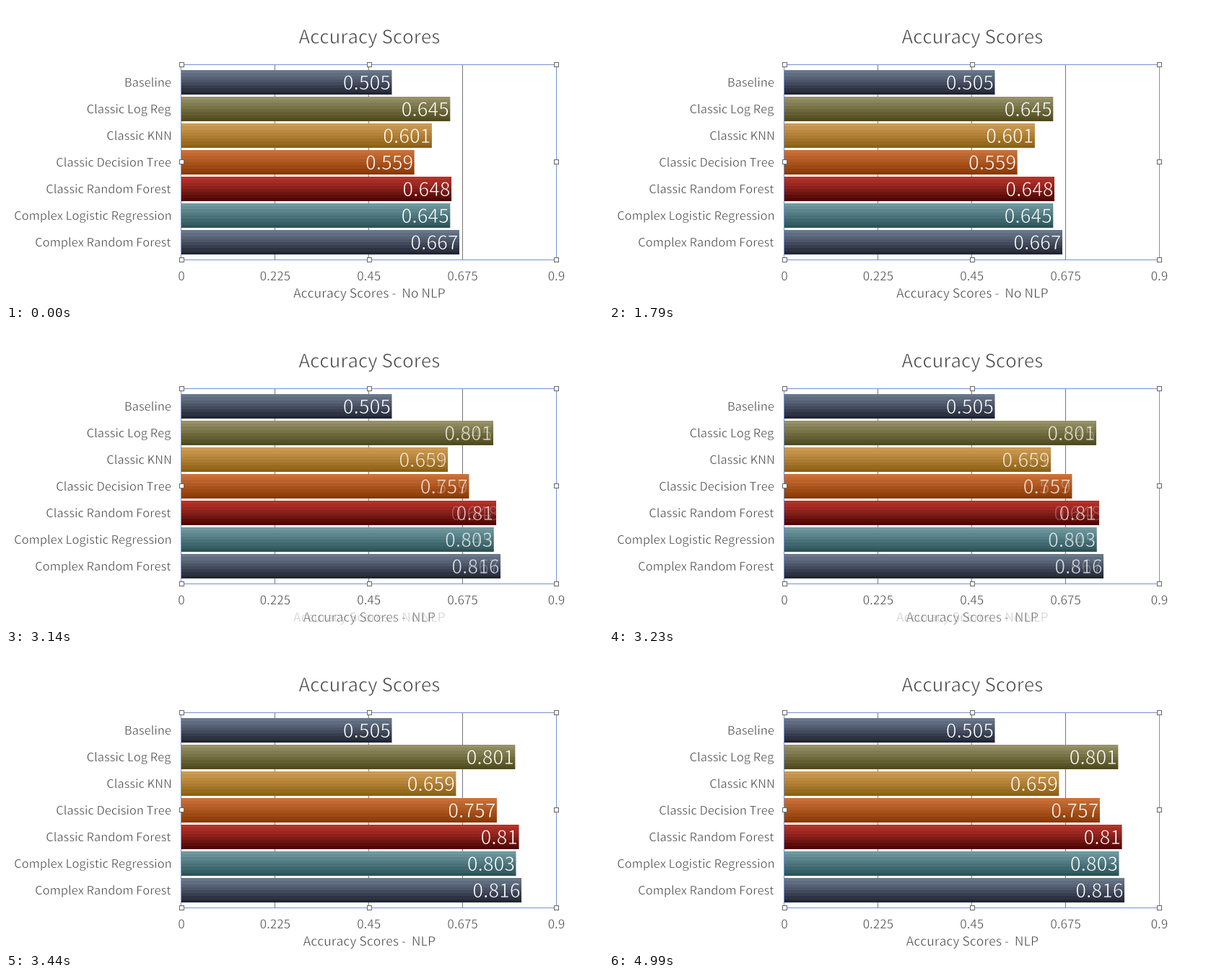
Animation, 827 px wide and 411 px high, one loop 6020 ms. Source, as a matplotlib script:

```python
import numpy as np
import matplotlib.pyplot as plt
from matplotlib.animation import FuncAnimation
from matplotlib.colors import to_rgb
from matplotlib.patches import PathPatch, Rectangle
from matplotlib.path import Path
from matplotlib.textpath import TextPath
from matplotlib.transforms import Affine2D

W, H, DPI = 827, 411, 128
LOOP, TICK = 6020, 20
FONT = dict(family="Noto Sans CJK JP")
INK, GRID, BLUE = "#484848", "#777777", "#7391d6"
LEFT, RIGHT, TOP, BOTTOM = 243, 762, 81, 352
BAR_TOP, BAR_H, PITCH = 89, 34, 37
STRIPS, VALUE_SIZE = 8, 26.5

# The bars grow in visible steps along an ease-in-out curve.
STEP_TIMES = (2990, 3140, 3290, 3440)
STEP_EASE = (0, 0.184, 0.663, 0.977, 1)

SLATE = ("#69778a", "#475062", "#222735")
BARS = [
    ("Baseline", "0.505", "0.505", SLATE),
    ("Classic Log Reg", "0.645", "0.801", ("#969168", "#736e40", "#504b1f")),
    ("Classic KNN", "0.601", "0.659", ("#cc9a52", "#b07f34", "#8d6115")),
    ("Classic Decision Tree", "0.559", "0.757", ("#ca7039", "#ad551f", "#8a3a05")),
    ("Classic Random Forest", "0.648", "0.81", ("#b7302b", "#86201b", "#500603")),
    ("Complex Logistic Regression", "0.645", "0.803", ("#7199a0", "#4c767d", "#2d545a")),
    ("Complex Random Forest", "0.667", "0.816", SLATE),
]

fig = plt.figure(figsize=(W / DPI, H / DPI), dpi=DPI, facecolor="white")
ax = fig.add_axes([0, 0, 1, 1])
ax.set_xlim(0, W)
ax.set_ylim(H, 0)
ax.axis("off")


def signed_area(p):
    x, y = p.T
    return np.sum(x * np.roll(y, -1) - y * np.roll(x, -1)) / 2


def inset(p, d):
    """Move a closed outline by d along its left-hand normals."""
    p = p[np.hypot(*(np.roll(p, -1, 0) - p).T) > 0.01]
    e = np.roll(p, -1, 0) - p
    e /= np.hypot(*e.T)[:, None]
    n = np.column_stack((-e[:, 1], e[:, 0]))
    prev = np.roll(n, 1, 0)
    miter = np.maximum(1 + np.sum(n * prev, axis=1), 0.5)
    p = p + d * (n + prev) / miter[:, None]
    return np.vstack((p, p[:1]))


def light_text(s, size):
    """Text outline with strokes thinned to a light weight, y pointing down."""
    polys = [p / 10 for p in TextPath((0, 0), s, size=size * 10, prop=FONT).to_polygons()]
    areas = [signed_area(p) for p in polys]
    d = 0.013 * size * np.sign(max(areas, key=abs))
    flip = np.array([1, -1])
    return Path.make_compound_path(*(Path(inset(p, d) * flip, closed=True) for p in polys))


def place(patch, x, y):
    patch.set_transform(Affine2D().translate(x, y) + ax.transData)


def text(s, size, x, y, align=0.5, color=INK):
    path = light_text(s, size)
    box = path.get_extents()
    patch = ax.add_patch(PathPatch(path, fc=color, lw=0, zorder=5))
    place(patch, x - box.x0 - align * box.width, y)
    return patch


def rect(x, y, w, h, color, z=1, smooth=False):
    return ax.add_patch(Rectangle((x, y), w, h, fc=color, lw=0, zorder=z,
                                  antialiased=smooth, snap=not smooth))


def fade(patch, alpha):
    patch.set_alpha(alpha)
    patch.set_visible(alpha > 0)


def cross_fade(old, new, p):
    a = p * p * (3 - 2 * p)
    fade(old, 1 - a)
    fade(new, a)


def advance(s):
    return VALUE_SIZE * (0.555 * (len(s) - 1) + 0.278)


class Bar:
    def __init__(self, row, name, old, new, shades):
        y = BAR_TOP + PITCH * row
        self.base = y + 27
        self.old, self.new = old, new
        text(name, 16.4, 228, y + 23, align=1)
        rgb = np.array([to_rgb(c) for c in shades])
        edges = np.linspace(y, y + BAR_H, STRIPS + 1).round()
        self.strips = []
        for k, u in enumerate(np.linspace(0, 1, STRIPS)):
            color = [np.interp(u, (0, 0.5, 1), ch) for ch in rgb.T]
            height = edges[k + 1] - edges[k]
            self.strips.append(rect(LEFT, edges[k], 1, height, color, 2, smooth=True))
        self.labels = [text(s, VALUE_SIZE, 0, 0, color="white")
                       for s in dict.fromkeys((old, new))]

    def show(self, p):
        value = float(self.old) + (float(self.new) - float(self.old)) * p
        length = 519.5 * value / 0.9
        for s in self.strips:
            s.set_width(length)
        width = advance(self.old) + (advance(self.new) - advance(self.old)) * p
        mid = LEFT + length - 1.5 - width / 2
        for s, patch in zip((self.old, self.new), self.labels):
            place(patch, mid - advance(s) / 2, self.base)
        if len(self.labels) == 2:
            cross_fade(*self.labels, p)


text("Accuracy Scores", 25.9, 503, 52)
for k, s in enumerate(("0", "0.225", "0.45", "0.675", "0.9")):
    x = LEFT + 129.85 * k
    text(s, 17, x, 381)
    if 0 < k < 4:
        rect(int(x), TOP, 1, BOTTOM - TOP, GRID)

bars = [Bar(i, *spec) for i, spec in enumerate(BARS)]
captions = [text(f"Accuracy Scores -  {s}", 17.5, 503, 405) for s in ("No NLP", "NLP")]

# Selection frame with its handles.
for y in (TOP, BOTTOM):
    rect(LEFT, y, RIGHT - LEFT, 1, BLUE, 3)
for x in (LEFT - 1, RIGHT):
    rect(x, TOP, 1, BOTTOM - TOP, BLUE, 3)
for x in (LEFT, 503, RIGHT):
    for y in (TOP, 216, BOTTOM):
        if (x, y) != (503, 216):
            rect(x - 3, y - 3, 7, 7, "#666666", 4)
            rect(x - 2, y - 2, 5, 5, "white", 4)


def update(frame):
    t = (frame + 0.5) * TICK
    p = STEP_EASE[np.searchsorted(STEP_TIMES, t, side="right")]
    for bar in bars:
        bar.show(p)
    cross_fade(*captions, p)
    return []


anim = FuncAnimation(fig, update, frames=LOOP // TICK, interval=TICK,
                     repeat=True, repeat_delay=0, blit=False)
plt.show()
```
